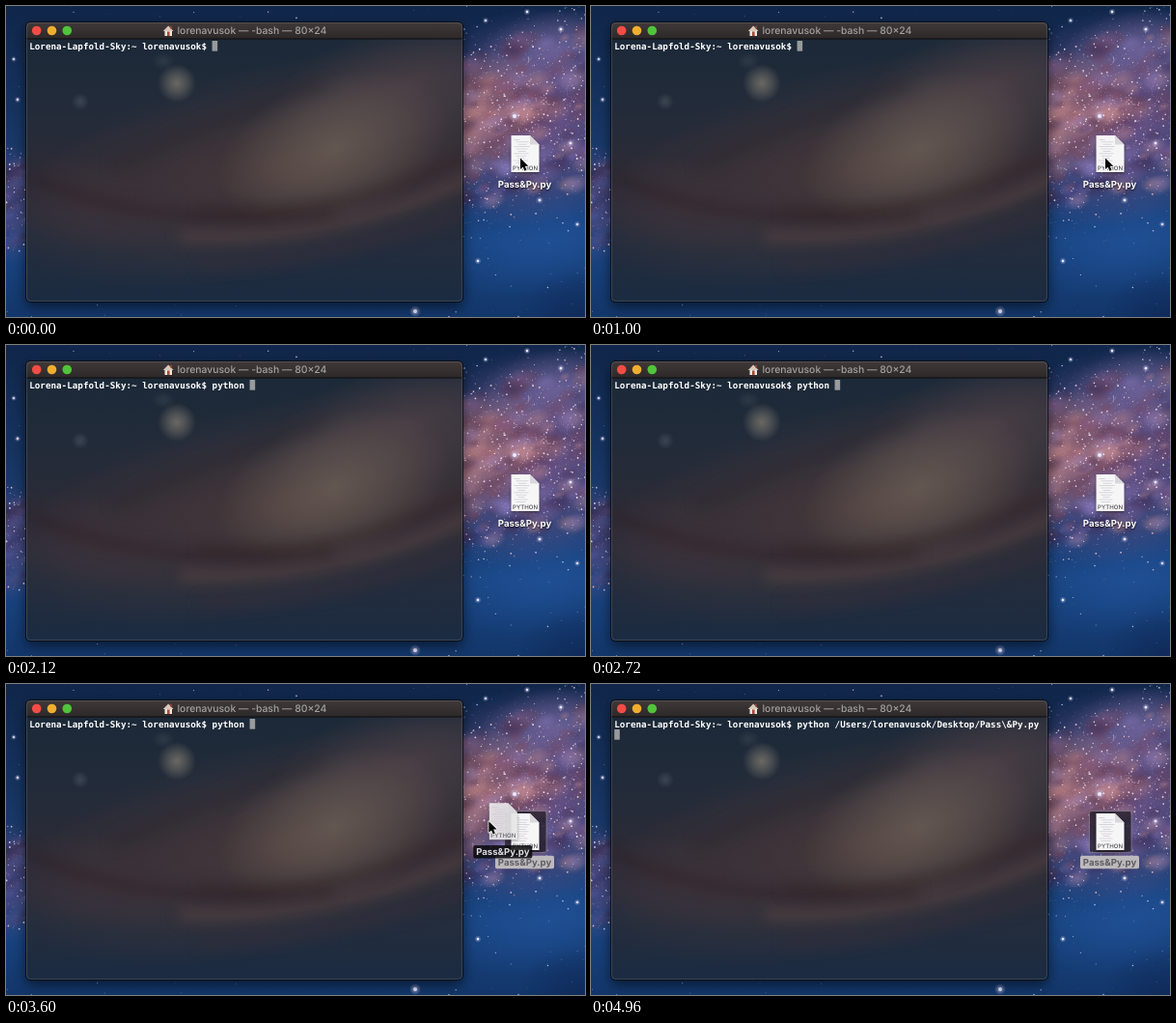
An HTML page with a canvas that plays this animation: 600 px wide and 322 px high, repeating every 5000 ms.

```html
<!DOCTYPE html>
<html lang="en">
<head>
<meta charset="utf-8">
<title>Running a script from the terminal</title>
<style>
  html, body { margin: 0; height: 100%; overflow: hidden; background: #12305a; }
  canvas { display: block; }
</style>
</head>
<body>
<canvas id="stage" width="600" height="322"></canvas>
<script>
const W = 600, H = 322, LOOP = 5000, TAU = Math.PI * 2;
const ctx = document.getElementById('stage').getContext('2d');
const USER = 'lorenavusok';
const PROMPT = `Lorena-Lapfold-Sky:~ ${USER}$ `;
const FILE = 'Pass&Py.py';
const PATH = `/Users/${USER}/Desktop/Pass\\&Py.py`;
const KEYS = [1080, 1220, 1340, 1460, 1620, 1740, 1900];
const GRAB = 3480, ARRIVE = 3920, DROP = 3960, ENTER = 4240, HIDE = 4400;
const CELL = 5.57, ROW = 11;

let seed = 11;
function random() {
  seed = (seed * 16807) % 2147483647;
  return seed / 2147483647;
}
const between = (a, b) => a + (b - a) * random();
const pick = list => list[Math.floor(random() * list.length)];

// Soft elliptical light
function glow(c, x, y, rx, ry, angle, rgb, alpha) {
  c.save();
  c.translate(x, y);
  c.rotate(angle);
  c.scale(rx, ry);
  const g = c.createRadialGradient(0, 0, 0, 0, 0, 1);
  g.addColorStop(0, `rgba(${rgb},${alpha})`);
  g.addColorStop(0.5, `rgba(${rgb},${alpha * 0.55})`);
  g.addColorStop(1, `rgba(${rgb},0)`);
  c.fillStyle = g;
  c.fillRect(-1, -1, 2, 2);
  c.restore();
}

function dot(c, x, y, r, fill) {
  c.fillStyle = fill;
  c.beginPath();
  c.arc(x, y, r, 0, TAU);
  c.fill();
}

function polygon(c, points, fill, stroke) {
  c.beginPath();
  points.forEach(([x, y]) => c.lineTo(x, y));
  c.closePath();
  if (fill) { c.fillStyle = fill; c.fill(); }
  if (stroke) { c.strokeStyle = stroke; c.stroke(); }
}

function box(c, x, y, w, h, r, fill, stroke) {
  c.beginPath();
  c.roundRect(x, y, w, h, r);
  if (fill) { c.fillStyle = fill; c.fill(); }
  if (stroke) { c.strokeStyle = stroke; c.stroke(); }
}

function vertical(c, y0, y1, ...colors) {
  const g = c.createLinearGradient(0, y0, 0, y1);
  colors.forEach((color, i) => g.addColorStop(i / (colors.length - 1), color));
  return g;
}

function lane(c, [a, b, d], width, color) {
  c.lineWidth = width;
  c.strokeStyle = color;
  c.beginPath();
  c.moveTo(...a);
  c.quadraticCurveTo(...b, ...d);
  c.stroke();
}

// Speckled dust and stars around a tilted band
function cluster(c, x0, x1, middle, half, dust, blobs, stars) {
  const place = spread => {
    const x = between(x0, x1);
    const y = middle - 0.16 * (x - (x0 + x1) / 2) + spread * half;
    return [x, y];
  };
  for (let i = 0; i < blobs; i++) {
    const r = between(4, 13);
    glow(c, ...place(between(-0.85, 0.85)), r * 1.5, r, -0.35, pick(dust), 0.3);
  }
  for (let i = 0; i < stars; i++) {
    const size = random();
    const tint = pick(['255,238,246', '226,220,255', '240,196,204']);
    dot(c, ...place((between(-1, 1) + between(-1, 1)) * 0.6), 0.35 + 0.6 * size ** 4,
      `rgba(${tint},${0.25 + 0.65 * size})`);
  }
}

function drawSky(c) {
  c.fillStyle = vertical(c, 0, H, '#10264a', '#14305a', '#1a3a6c', '#1a4684', '#12366a');
  c.fillRect(0, 0, W, H);
  glow(c, 560, 245, 100, 50, -0.3, '36,88,164', 0.5);
  glow(c, 600, 322, 70, 50, 0, '14,34,78', 0.6);
  glow(c, 4, 205, 60, 62, -0.3, '92,76,126', 0.8);
  glow(c, 545, 115, 140, 112, -0.25, '122,88,140', 0.95);
  glow(c, 570, 45, 85, 42, -0.15, '138,120,180', 0.6);
  glow(c, 485, 112, 90, 65, -0.3, '190,126,124', 0.8);
  c.save();
  c.filter = 'blur(4px)';
  lane(c, [[455, 82], [520, 70], [575, 105]], 6, 'rgba(96,46,62,.5)');
  lane(c, [[455, 165], [520, 142], [575, 95]], 8, 'rgba(80,40,60,.5)');
  lane(c, [[455, 210], [530, 188], [610, 140]], 10, 'rgba(58,40,84,.45)');
  lane(c, [[-10, 180], [10, 170], [30, 165]], 12, 'rgba(40,24,46,.55)');
  c.restore();

  cluster(c, 460, 604, 115, 98, ['214,150,146', '152,134,206', '62,36,68', '126,60,72'], 130, 1300);
  cluster(c, -4, 24, 205, 50, ['120,112,180', '60,36,66', '30,52,110'], 24, 110);
  for (let i = 0; i < 420; i++) {
    const size = random();
    dot(c, random() * W, random() * H, 0.3 + 0.55 * size ** 3, `rgba(226,226,255,${0.2 + 0.6 * size})`);
  }
  const bright = [[527, 114, 2], [424, 316, 2], [585, 142, 1.3], [553, 201, 1.3], [540, 6, 1.2],
    [497, 15, 1.1], [575, 24, 1.3], [489, 264, 1.2], [592, 226, 1.1], [12, 97, 1.1], [8, 55, 1]];
  for (const [x, y, r] of bright) {
    glow(c, x, y, r * 3, r * 3, 0, '220,215,255', 0.6);
    dot(c, x, y, r, '#eeeaff');
  }
}

function drawWindow(c) {
  c.save();
  c.shadowColor = 'rgba(0,0,0,.6)';
  c.shadowBlur = 14;
  c.shadowOffsetY = 5;
  box(c, 21, 17, 452, 289, 4, '#1c2a3c');
  c.restore();

  c.save();
  c.beginPath();
  c.roundRect(21, 17, 452, 289, 4);
  c.clip();
  c.fillStyle = vertical(c, 34, 306, '#1c2938', '#222b3a', '#2b2b36', '#252d3c', '#1b2b41');
  c.fillRect(21, 34, 452, 272);
  glow(c, 300, 165, 310, 110, -0.22, '76,58,58', 0.85);
  glow(c, 420, 80, 150, 65, -0.25, '82,66,72', 0.7);
  glow(c, 340, 148, 125, 75, -0.35, '112,100,90', 0.7);
  glow(c, 90, 205, 110, 50, 0.1, '66,50,58', 0.55);
  c.filter = 'blur(7px)';
  lane(c, [[180, 238], [340, 245], [480, 178]], 13, 'rgba(92,70,66,.55)');
  lane(c, [[20, 175], [140, 232], [340, 215]], 10, 'rgba(44,28,32,.45)');
  lane(c, [[200, 212], [340, 225], [480, 152]], 9, 'rgba(52,32,34,.5)');
  lane(c, [[110, 165], [210, 120], [330, 80]], 12, 'rgba(40,36,44,.35)');
  lane(c, [[200, 268], [350, 262], [480, 215]], 12, 'rgba(56,46,58,.4)');
  c.filter = 'none';
  glow(c, 177, 80, 20, 20, 0, '146,138,122', 0.65);
  glow(c, 77, 99, 9, 9, 0, '96,108,118', 0.4);
  glow(c, 163, 57, 12, 9, 0, '84,90,100', 0.3);

  c.fillStyle = vertical(c, 17, 34, '#403939', '#2d2829');
  c.fillRect(21, 17, 452, 17);
  c.fillStyle = '#0c0c0e';
  c.fillRect(21, 33.5, 452, 1);
  c.restore();
  c.lineWidth = 1;
  box(c, 20.5, 16.5, 453, 290, 4.5, null, 'rgba(8,10,16,.8)');
  box(c, 21.5, 17.5, 451, 288, 4, null, 'rgba(165,165,170,.22)');

  ['#f24c46', '#f0ae2f', '#50c43a'].forEach((color, i) => dot(c, 31.7 + i * 15.8, 25.5, 4.8, color));

  // Home symbol
  c.fillStyle = '#ece7e0';
  c.fillRect(164.5, 25, 7.5, 6);
  polygon(c, [[162.8, 26], [168.2, 20.5], [173.6, 26]], '#d9c9bb');
  c.fillStyle = '#a94a38';
  c.fillRect(167, 26.5, 2.6, 4.5);
  c.fillRect(170.3, 20.7, 1.4, 3);

  c.font = '500 10.4px Inter, sans-serif';
  c.textAlign = 'left';
  c.fillStyle = '#a5a1a1';
  c.fillText(`${USER} — -bash — 80×24`, 177.5, 29.4);
}

function drawPage(c, x, y) {
  const shape = [[0, 0], [19.5, 0], [29, 9.5], [29, 38], [0, 38]].map(([a, b]) => [x + a, y + b]);
  c.save();
  c.shadowColor = 'rgba(0,0,0,.5)';
  c.shadowBlur = 3;
  c.shadowOffsetY = 1;
  polygon(c, shape, '#f7f6f7');
  c.restore();
  c.fillStyle = '#cfcdd2';
  for (let i = 0; i < 11; i++) c.fillRect(x + 3 + (i % 3) * 2, y + 4 + i * 2.4, 6 + (i * 7) % 11, 0.8);
  polygon(c, [[x + 19.5, y], [x + 19.5, y + 9.5], [x + 29, y + 9.5]], '#d9d7dc');
  c.font = '500 6.1px Inter, sans-serif';
  c.textAlign = 'center';
  c.fillStyle = '#4e4e52';
  c.fillText('PYTHON', x + 14.5, y + 36);
}

function drawLabel(c, x, y, fill, back) {
  if (back) box(c, x - 30.5, y - 10, 61, 13.5, 2, back);
  c.save();
  if (!back) {
    c.shadowColor = 'rgba(0,0,0,.85)';
    c.shadowBlur = 2;
    c.shadowOffsetY = 1;
  }
  c.font = '700 9.6px Inter, sans-serif';
  c.textAlign = 'center';
  c.fillStyle = fill;
  c.fillText(FILE, x, y);
  c.restore();
}

function drawIcon(c, selected) {
  if (selected) {
    c.lineWidth = 1;
    box(c, 516.5, 131.5, 43.5, 43, 2, 'rgba(28,24,32,.72)', 'rgba(150,145,155,.6)');
  }
  drawPage(c, 523.5, 134);
  if (selected) drawLabel(c, 537.5, 187.8, '#5e5c60', '#bdbabd');
  else drawLabel(c, 537.5, 187.8, '#fff');
}

function drawPointer(c, x, y) {
  const shape = [[0, 0], [0, 11.6], [2.7, 9.2], [4.5, 13.2], [6.5, 12.3], [4.8, 8.4], [8.3, 8.2]]
    .map(([a, b]) => [x + a, y + b]);
  c.lineWidth = 1.6;
  c.lineJoin = 'round';
  polygon(c, shape, null, '#f4f4f4');
  polygon(c, shape, '#050505');
}

function drawTerminal(c, t) {
  const typed = 'python '.slice(0, KEYS.filter(k => t >= k).length);
  const line = PROMPT + typed + (t >= DROP ? PATH : '');
  const column = t >= ENTER ? 0 : line.length;
  c.fillStyle = '#989a9c';
  c.fillRect(24.2 + column * CELL, t >= ENTER ? 36 + ROW : 36, 5.6, 10.7);
  c.font = 'bold 9.25px "DejaVu Sans Mono", monospace';
  c.textAlign = 'left';
  c.fillStyle = '#fff';
  [...line].forEach((char, i) => c.fillText(char, 24.2 + i * CELL, 44.6));
}

const ease = p => p < 0.5 ? 2 * p * p : 1 - 2 * (1 - p) ** 2;
const progress = (t, from, to) => ease(Math.min(1, Math.max(0, (t - from) / (to - from))));
const bend = (a, b, d, u) => (1 - u) ** 2 * a + 2 * u * (1 - u) * b + u * u * d;

// Reach for the icon, then carry it along an arc into the window
function pointerAt(t) {
  const reach = progress(t, 3000, 3360), carry = progress(t, GRAB, ARRIVE);
  if (carry > 0) return [bend(523, 450, 351, carry), bend(153, 115, 108, carry)];
  return [533 - 10 * reach, 157.5 - 4.5 * reach];
}

const backdrop = document.createElement('canvas');
backdrop.width = W;
backdrop.height = H;
const back = backdrop.getContext('2d');
back.textRendering = ctx.textRendering = 'geometricPrecision';
drawSky(back);
drawWindow(back);

function draw(t) {
  ctx.drawImage(backdrop, 0, 0);
  drawTerminal(ctx, t);
  drawIcon(ctx, t >= 3380);
  const [x, y] = pointerAt(t);
  if (t >= GRAB && t < DROP) {
    const dx = x - 523, dy = y - 153;
    ctx.globalAlpha = 0.86;
    drawPage(ctx, 523.5 + dx, 134 + dy);
    drawLabel(ctx, 537.5 + dx, 187.8 + dy, '#fff', '#0b0a0d');
    ctx.globalAlpha = 1;
  }
  if (t < KEYS[0] || (t >= 3000 && t < HIDE)) drawPointer(ctx, x, y);
}

const start = performance.now();
function tick() {
  draw((performance.now() - start) % LOOP);
  requestAnimationFrame(tick);
}
tick();
</script>
</body>
</html>
```
